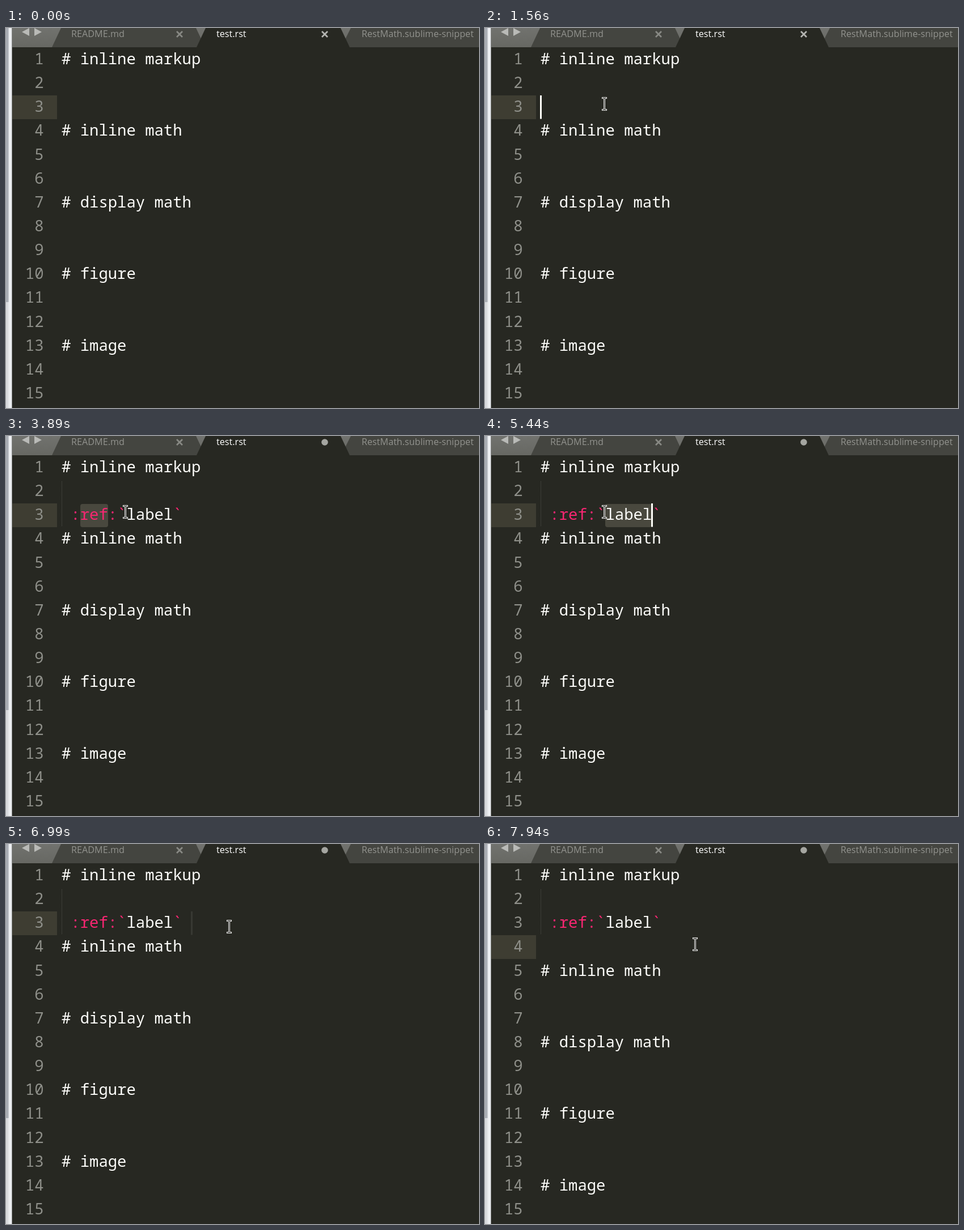
An HTML page with a canvas that plays this animation: 834 px wide and 671 px high, repeating every 8000 ms.

```html
<!DOCTYPE html>
<html lang="en">
<head>
<meta charset="utf-8">
<title>Editor snippet demo</title>
<style>
  html, body { margin: 0; width: 100%; height: 100%; overflow: hidden; background: #272822; }
  canvas { display: block; }
</style>
</head>
<body>
<canvas id="stage" width="834" height="671"></canvas>
<script>
const ctx = document.getElementById('stage').getContext('2d');
const LOOP = 8000;
const LEFT = 98, TOP = 34.6, COL = 16.35, ROW = 42.14;
const CODE_FONT = '500 27.25px "Noto Sans Mono", monospace';
const TAB_FONT = '16.2px "Open Sans", sans-serif';
const BG = '#272822', PINK = '#f92672', WHITE = '#fdfdfa';

const LINES = ['# inline markup', '', '', '# inline math', '', '', '# display math',
  '', '', '# figure', '', '', '# image', '', ''];

// Each step overrides part of the state before it.
// row/col: caret place, caret: opacity, mouse: [x, y], select: [from, to] columns
const STEPS = [
  [0, { row: 2, col: 0, caret: 0, mouse: null, text: '', select: null, snippet: false, dirty: false, extra: false }],
  [140, { mouse: [433, 363] }],
  [310, { mouse: [352, 254] }],
  [470, { mouse: [243, 150] }],
  [620, { mouse: [201, 115] }],
  [780, { row: 1, caret: 1 }],
  [1240, { mouse: [206, 126], caret: 0.1 }],
  [1400, { mouse: [210, 134], caret: 0 }],
  [1560, { row: 2, caret: 1 }],
  [2030, { caret: 0.1 }],
  [2180, { caret: 0 }],
  [2650, { text: ':', col: 1, caret: 1, dirty: true }],
  [2960, { text: ':r', col: 2 }],
  [3120, { text: ':re', col: 3 }],
  [3270, { text: ':ref', col: 4 }],
  [3430, { text: '', snippet: true, col: 5, select: [2, 5] }],
  [3740, { caret: 0.1 }],
  [3890, { caret: 0 }],
  [4500, { caret: 1 }],
  [4820, { caret: 0.1 }],
  [4980, { caret: 0 }],
  [5440, { caret: 1, col: 12, select: [7, 12] }],
  [5910, { caret: 0.1 }],
  [6070, { caret: 0, mouse: [232, 146] }],
  [6230, { mouse: [275, 160] }],
  [6380, { mouse: [322, 163] }],
  [6540, { mouse: [358, 158], col: 14, caret: 1, select: null }],
  [6690, { mouse: [382, 150] }],
  [6850, { mouse: [393, 146] }],
  [6990, { caret: 0.08 }],
  [7310, { extra: true, row: 3, col: 1, caret: 1 }],
  [7630, { mouse: [384, 160] }],
  [7790, { mouse: [370, 177], caret: 0.1 }],
  [7940, { caret: 0 }],
];

const stateAt = t => Object.assign({}, ...STEPS.filter(s => s[0] <= t).map(s => s[1]));
const colX = c => LEFT + c * COL;
const rowY = r => TOP + r * ROW;

function rect(x, y, w, h, color) {
  ctx.fillStyle = color;
  ctx.fillRect(x, y, w, h);
}

function poly(color, ...points) {
  ctx.fillStyle = color;
  ctx.beginPath();
  points.forEach(p => ctx.lineTo(...p));
  ctx.fill();
}

function label(text, x, y, color, font, align = 'left') {
  ctx.font = font;
  ctx.textAlign = align;
  ctx.fillStyle = color;
  ctx.fillText(text, x, y);
}

const code = (text, row, col, color = WHITE) =>
  label(text, colX(col), rowY(row) + 29.4, color, CODE_FONT);

function cross(x, y, color) {
  ctx.strokeStyle = color;
  ctx.lineWidth = 2.8;
  ctx.lineCap = 'butt';
  ctx.beginPath();
  ctx.moveTo(x - 5, y - 5); ctx.lineTo(x + 5, y + 5);
  ctx.moveTo(x + 5, y - 5); ctx.lineTo(x - 5, y + 5);
  ctx.stroke();
}

function drawTabs(dirty) {
  const bar = ctx.createLinearGradient(0, 0, 0, 34);
  bar.addColorStop(0, '#71726e');
  bar.addColorStop(1, '#676863');
  rect(11, 0, 823, 34, bar);
  poly('#b9bab7', [28, 7], [41, 0], [41, 14]);
  poly('#b9bab7', [50, 0], [63, 7], [50, 14]);
  poly('#444540', [81, 34], [97, 0], [335, 0], [351, 34]);
  poly('#444540', [591, 34], [608, 0], [834, 0], [834, 34]);
  poly(BG, [336, 34], [352, 0], [590, 0], [606, 34]);
  label('README.md', 115, 16, '#92938e', TAB_FONT);
  label('test.rst', 371, 16, '#ffffff', TAB_FONT);
  label('RestMath.sublime-snippet', 627, 16, '#92938e', TAB_FONT);
  cross(306, 11, '#888984');
  if (!dirty) return cross(562, 11, '#b4b5b1');
  ctx.fillStyle = '#a5a6a1';
  ctx.beginPath();
  ctx.arc(562, 11, 5.8, 0, 7);
  ctx.fill();
}

function drawMouse([x, y]) {
  ctx.lineCap = 'square';
  for (const [width, color] of [[3, '#f2f2f0'], [1, '#1c1d19']]) {
    ctx.lineWidth = width;
    ctx.strokeStyle = color;
    ctx.beginPath();
    for (const end of [-10.5, 10.5]) {
      ctx.moveTo(x - 2.5, y + end);
      ctx.lineTo(x + 3.5, y + end);
    }
    ctx.moveTo(x + 0.5, y - 10);
    ctx.lineTo(x + 0.5, y + 10);
    ctx.stroke();
  }
}

function draw(t) {
  const s = stateAt(t);
  rect(0, 0, 834, 671, BG);
  rect(0, 0, 10.5, 671, '#eceef1');
  rect(0, 0, 4.5, 671, '#d9dbdf');
  rect(0, 0, 4.5, 484, '#a9adb4');
  drawTabs(s.dirty);

  rect(11, Math.round(rowY(s.row)), 79, 42, '#3e3d32');
  if (s.select) {
    const [from, to] = s.select.map(c => Math.round(colX(c)));
    ctx.fillStyle = '#49483e';
    ctx.beginPath();
    ctx.roundRect(from, Math.round(rowY(2)) + 1, to - from, 41, 4);
    ctx.fill();
  }

  const lines = LINES.slice();
  lines[2] = s.text;
  if (s.extra) lines.splice(3, 0, '');
  for (let row = 0; row < 15; row++) {
    label(row + 1, 66.5, rowY(row) + 29.4, '#8f908a', CODE_FONT, 'right');
    code(lines[row], row, 0);
  }

  if (s.snippet) {
    for (let y = 80; y < 160; y += 2) rect(98, y, 1, 1, '#50514a');
    code(':ref:`', 2, 1, PINK);
    code('label', 2, 7);
    code('`', 2, 12, PINK);
  }

  rect(Math.round(colX(s.col) - 1.4), Math.round(rowY(s.row)), 3, 41.5, `rgba(255,255,250,${s.caret})`);
  if (s.mouse) drawMouse(s.mouse);
}

function tick() {
  draw(performance.now() % LOOP);
  requestAnimationFrame(tick);
}
tick();
</script>
</body>
</html>
```
